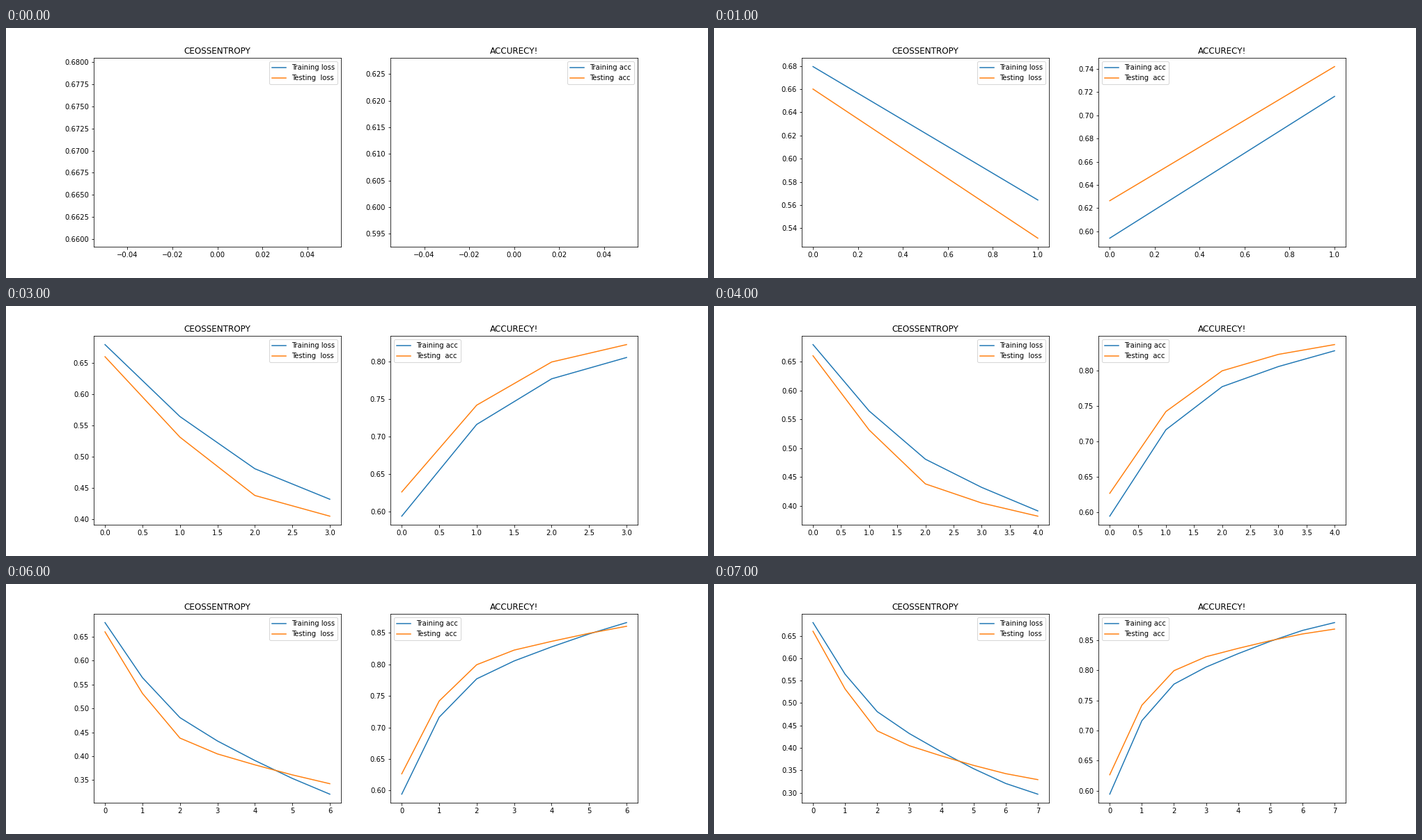
Recreate the animation shown at these times as a matplotlib script. Size 1008 by 360 pixels, loop 8000 ms.

```python
import numpy as np
import matplotlib.pyplot as plt
from matplotlib.animation import FuncAnimation

EPOCHS = 8
KEY_EPOCHS = (0, 2, 3, 7)
LATE_EASE = 1.25


def learning_curve(keys, early_ease):
    """Ease out from each key value to the next, one value per epoch."""
    curve = [keys[0]]
    for i, (low, high) in enumerate(zip(KEY_EPOCHS, KEY_EPOCHS[1:])):
        t = np.arange(1, high - low + 1) / (high - low)
        eased = 1 - (1 - t) ** (LATE_EASE if i else early_ease)
        curve.extend(keys[i] + (keys[i + 1] - keys[i]) * eased)
    return curve


def make_panel(title, suffix, early_ease, training_keys, testing_keys):
    lines = {
        f"Training {suffix}": learning_curve(training_keys, early_ease),
        f"Testing  {suffix}": learning_curve(testing_keys, early_ease),
    }
    return title, lines


PANELS = [
    make_panel("CEOSSENTROPY", "loss", 1.25,
               (0.6795, 0.4808, 0.4320, 0.2968), (0.6601, 0.4380, 0.4049, 0.3292)),
    make_panel("ACCURECY!", "acc", 1.59,
               (0.59415, 0.7770, 0.8054, 0.8793), (0.6264, 0.7994, 0.8226, 0.8685)),
]

plt.rcParams.update({"font.family": "DejaVu Sans", "font.size": 10})

fig, axes = plt.subplots(1, 2, figsize=(14, 5), dpi=72, facecolor="white")
fig.subplots_adjust(left=0.125, right=0.9, bottom=0.125, top=0.88, wspace=0.2)


def update(epoch):
    for ax, (title, lines) in zip(axes, PANELS):
        ax.clear()
        for label, values in lines.items():
            ax.plot(range(epoch + 1), values[:epoch + 1], label=label)
        ax.set_title(title)
        ax.legend(loc="best")
    return []


anim = FuncAnimation(fig, update, frames=EPOCHS, init_func=lambda: update(0),
                     interval=1000, repeat=True, repeat_delay=0)
plt.show()
```
